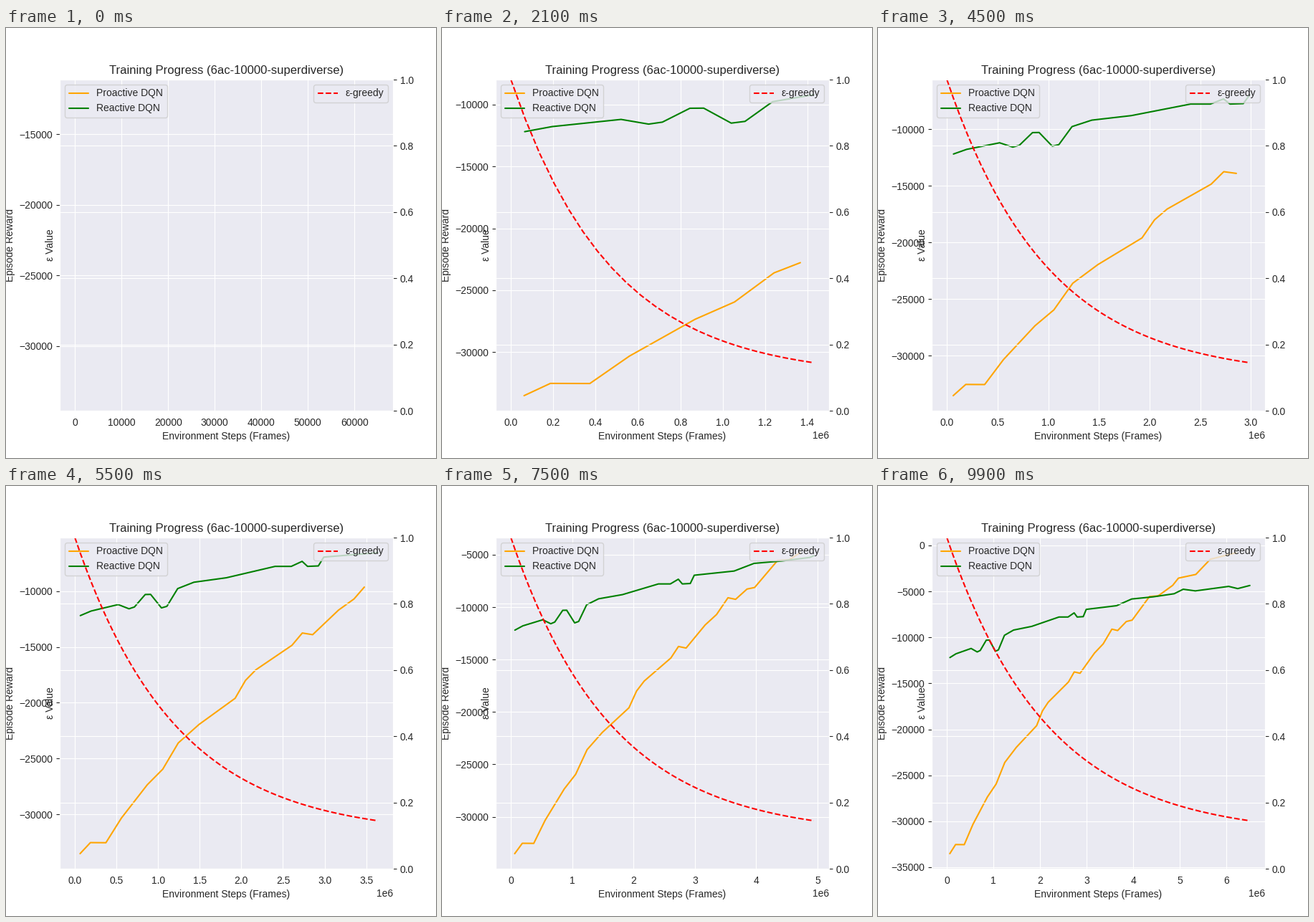
A matplotlib script for the animation above (10 s loop, 600x600 px).

```python
import matplotlib.pyplot as plt
import numpy as np
from matplotlib.animation import FuncAnimation

FRAMES = 100
PROACTIVE_STEP, REACTIVE_STEP = 62100, 65000
EPS_MIN, EPS_DECAY = 0.1, 3.0
INK = ".15"

plt.rcParams.update({
    "font.family": "Liberation Sans",
    "text.color": INK,
    "axes.labelcolor": INK,
    "xtick.color": INK,
    "ytick.color": INK,
    "axes.facecolor": "#EAEAF2",
    "axes.edgecolor": "white",
    "axes.grid": True,
    "axes.axisbelow": True,
    "grid.color": "white",
    "lines.solid_capstyle": "round",
    "xtick.bottom": False,
})

episodes = np.arange(1, FRAMES + 1)


def rewards(*bends):
    """Straight runs between (episode, reward in thousands) bends."""
    at, value = zip(*bends)
    return 1000 * np.interp(episodes, at, value)


def padded(low, high, margin=0.05):
    pad = margin * (high - low)
    return low - pad, high + pad


proactive = rewards(
    (1, -33.52), (3, -32.53), (6, -32.54), (9, -30.33), (14, -27.35),
    (17, -25.95), (20, -23.6), (24, -21.95), (31, -19.6), (33, -18),
    (35, -17.05), (42, -14.85), (44, -13.75), (46, -13.9), (51, -11.7),
    (54, -10.7), (57, -9.1), (59, -9.25), (62, -8.27), (64, -8.12),
    (70, -5.55), (73, -5.48), (78, -4.34), (80, -3.55), (86, -3.15),
    (91, -1.5), (100, -0.78))
reactive = rewards(
    (1, -12.19), (3, -11.78), (8, -11.2), (10, -11.58), (11, -11.42),
    (13, -10.3), (14, -10.29), (16, -11.5), (17, -11.36), (19, -9.77),
    (22, -9.2), (28, -8.8), (37, -7.78), (40, -7.78), (42, -7.33),
    (43, -7.78), (45, -7.74), (46, -6.95), (56, -6.55), (61, -5.82),
    (68, -5.59), (75, -5.25), (78, -4.76), (82, -4.94), (93, -4.45),
    (96, -4.69), (100, -4.35))

fig, ax = plt.subplots(figsize=(6, 6), dpi=100)
eps_ax = ax.twinx()

pro_line, = ax.plot([], [], color="orange", label="Proactive DQN")
re_line, = ax.plot([], [], color="green", label="Reactive DQN")
eps_line, = eps_ax.plot([], [], color="red", ls="--", label="ε-greedy")

ax.set_title("Training Progress (6ac-10000-superdiverse)")
ax.set_xlabel("Environment Steps (Frames)")
ax.set_ylabel("Episode Reward")
eps_ax.set_ylabel("ε Value")
eps_ax.yaxis.set_label_position("left")
eps_ax.set_ylim(0, 1)
ax.legend(loc="upper left")
eps_ax.legend(loc="upper right")


def update(i):
    n = i + 1
    last = n * REACTIVE_STEP
    pro_line.set_data(episodes[:n] * PROACTIVE_STEP, proactive[:n])
    re_line.set_data(episodes[:n] * REACTIVE_STEP, reactive[:n])

    # The decay always spans the whole visible run.
    t = np.linspace(0, 1, n)
    eps_line.set_data(t * last, EPS_MIN + (1 - EPS_MIN) * np.exp(-EPS_DECAY * t))

    shown = np.concatenate([proactive[:n], reactive[:n]])
    ax.set_xlim(padded(0, last))
    ax.set_ylim(padded(shown.min(), shown.max()))
    return pro_line, re_line, eps_line


anim = FuncAnimation(fig, update, frames=FRAMES, interval=100, repeat=True,
                     repeat_delay=0, blit=False)
plt.show()
```
